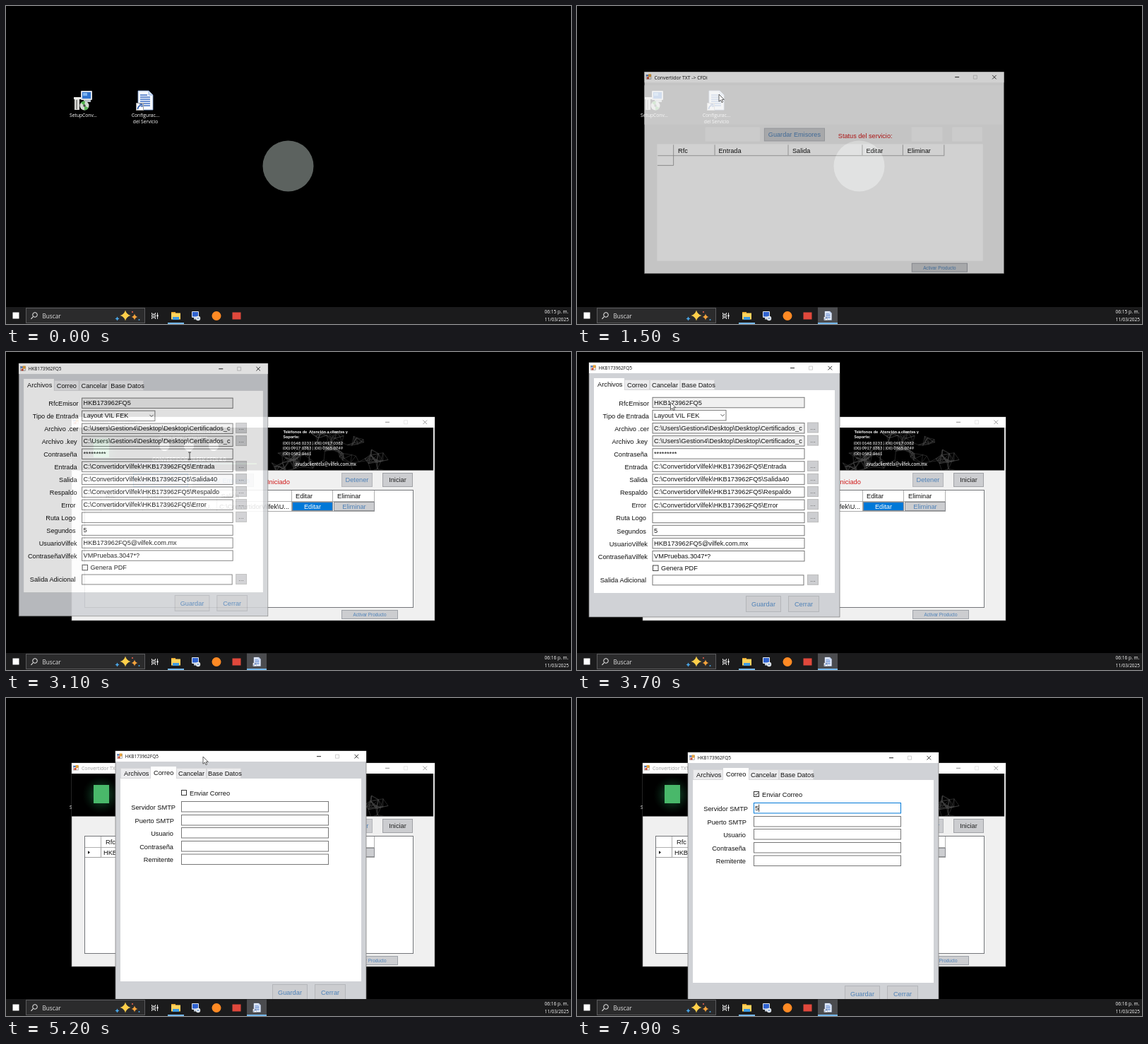
An HTML page for the animation above (8 s loop, 800x450 px).

```html
<!DOCTYPE html>
<html lang="es">
<head>
<meta charset="utf-8">
<title>Convertidor</title>
<style>
  html, body { margin: 0; width: 100%; height: 100%; overflow: hidden; background: #000; }
  svg { display: block; width: 800px; height: 450px; }
  text { font: 9.25px "Liberation Sans", Arial, sans-serif; white-space: pre; }
  .ui { font-family: "Open Sans", "Noto Sans", sans-serif; }
  .strong { font-weight: 500; }
  .ban { font-family: Lato, "Open Sans", sans-serif; }
</style>
</head>
<body>
<svg id="stage" viewBox="0 0 800 450" xmlns="http://www.w3.org/2000/svg"></svg>
<script>
const LOOP = 8000, STEP = 100;
const TAX_ID = 'HKB173962FQ5', BASE = 'C:\\ConvertidorVilfek\\';
const BLUE = '#0078d7', STEEL = '#4f82b8', FACE = '#cccdd0';

// markup helpers
const rect = (x, y, w, h, fill, extra = '') =>
  `<rect x="${x}" y="${y}" width="${w}" height="${h}" fill="${fill}" ${extra}/>`;
const box = (x, y, w, h, fill, stroke, extra = '') =>
  rect(x + .5, y + .5, w - 1, h - 1, fill, `stroke="${stroke}" ${extra}`);
const text = (x, y, s, fill = '#111', extra = '') =>
  `<text x="${x}" y="${y}" fill="${fill}" ${extra}>${s}</text>`;
const ui = (x, y, s, size, fill, extra = '') =>
  text(x, y, s, fill, `class="ui${fill === '#fff' ? ' strong' : ''}" style="font-size:${size}px" ${extra}`);
const ban = (x, y, s, size, weight = 500) =>
  text(x, y, s, '#fff', `class="ban" style="font-size:${size}px;font-weight:${weight}"`);
const path = (d, stroke, width = 1, fill = 'none', extra = '') =>
  `<path d="${d}" fill="${fill}" stroke="${stroke}" stroke-width="${width}" ${extra}/>`;
const circle = (x, y, r, fill) => `<circle cx="${x}" cy="${y}" r="${r}" fill="${fill}"/>`;
const group = (id, body) => `<g id="${id}">${body}</g>`;
const middle = 'text-anchor="middle"', end = 'text-anchor="end"';
const button = (x, y, w, h, label, color = STEEL, stroke = '#b4b6ba') =>
  box(x, y, w, h, FACE, stroke) + text(x + w / 2, y + h / 2 + 3.4, label, color, middle);
const star = (x, y, r, fill) =>
  `<path d="M${x} ${y - r}Q${x + r * .2} ${y - r * .2} ${x + r} ${y}Q${x + r * .2} ${y + r * .2} ${x} ${y + r}Q${x - r * .2} ${y + r * .2} ${x - r} ${y}Q${x - r * .2} ${y - r * .2} ${x} ${y - r}" fill="${fill}"/>`;

function sheet(x, y, s) {
  const lines = [6, 9, 12, 15, 18, 21].map(v => `M5 ${v}H${v < 8 ? 15 : 19}`).join('');
  return `<g transform="translate(${x} ${y}) scale(${s})">` +
    path('M2 0H17L23 6V27H2Z', '#8aa6d8', .8, '#f4f8ff') + path('M17 0V6H23', '#8aa6d8', .8, '#cfe0f8') +
    path(lines, '#3f6fc4', 1.4) + box(-1, 17, 11, 11, '#fff', '#999') +
    path('M1.5 26Q2 21 6 21M4 19H7.5V23', '#1d4fa8', 1.6) + '</g>';
}

function setupIcon() {
  return rect(97, 130, 7, 17, '#d8d8d4') + rect(96, 129, 11, 3, '#f0f0ec') + rect(99, 133, 2, 13, '#8f8f8c') +
    rect(106, 120, 16, 13, '#d5dbe4', 'rx="1"') + rect(108, 122, 12, 9, '#2f74d0') + rect(109, 123, 6, 4, '#7db4f2') +
    rect(110, 133, 10, 3, '#b9bec6') + circle(111, 141, 6.5, '#cfd8d0') +
    path('M111 141L106 137A6.5 6.5 0 0 1 112 134.6Z', 'none', 0, '#4fae4c') +
    path('M111 141L116.5 144A6.5 6.5 0 0 1 111 147.4Z', 'none', 0, '#58b455') + circle(111, 141, 1.7, '#444');
}

const formIcon = (x, y) => rect(x, y + 1, 7, 6, '#f2f2f2', 'stroke="#8a8a8a" stroke-width=".6"') +
  rect(x, y + 1, 7, 2, '#3f73c8') + rect(x + 3, y, 4, 4, '#e8a33a') + rect(x + 1, y + 4, 3, 3, '#c8503c');

const captionButtons = (right, y, color) =>
  path(`M${right - 70} ${y}h6`, color) + path(`M${right - 43.5} ${y - 2.5}h5v5h-5z`, '#c4c4c4', .8) +
  path(`M${right - 16.5} ${y - 2.8}l5.6 5.6m0 -5.6l-5.6 5.6`, color, .9);

// wire dome in the banner
function dome() {
  let seed = 11;
  const rnd = () => (seed = seed * 16807 % 2147483647) / 2147483647;
  const pts = Array.from({ length: 120 }, () => {
    const a = Math.PI * rnd(), r = Math.sqrt(.08 + .92 * rnd());
    return [460 + 86 * r * Math.cos(a), 170 - 58 * r * Math.sin(a)];
  });
  let d = '';
  pts.forEach((p, i) => pts.slice(i + 1).forEach(q => {
    if (Math.hypot(p[0] - q[0], p[1] - q[1]) < 13)
      d += `M${p[0].toFixed(1)} ${p[1].toFixed(1)}L${q[0].toFixed(1)} ${q[1].toFixed(1)}`;
  }));
  return path(d, '#4a4a4a', .5);
}

function desktop() {
  return rect(0, 0, 800, 450, '#000') + setupIcon() + sheet(185, 120, 1) +
    ui(109.5, 157, 'SetupConv...', 6.7, '#fff', middle) +
    ui(197.5, 157, 'Configurac...', 6.8, '#fff', middle) +
    ui(197.5, 166, 'del Servicio', 6.7, '#fff', middle) +
    circle(399.5, 226.5, 36, '#5c625f');
}

function banner() {
  return rect(93, 107, 512, 60.5, '#000') + rect(108, 110, 54, 54, 'url(#glow)') +
    `<g clip-path="url(#bannerClip)">${dome()}</g>` +
    rect(124, 123, 22, 26, '#49b86a') +
    ban(216, 114.5, 'Consulta nuestros horarios de servicio', 5.6) +
    ban(216, 122, '¿Tienes dudas? Contáctanos', 5.6) +
    [224.5, 259, 294].map(x => circle(x, 133, 7, '#fff')).join('') +
    ban(207, 155, 'CONVERTIDOR VILFEK CFDI 4.0', 7, 700) +
    rect(181, 157.5, 174, 1.3, 'url(#rule)') +
    ban(392.5, 114.5, 'Teléfonos de  Atención a clientes y', 6, 700) + ban(392.5, 122, 'Soporte:', 6, 700) +
    ban(392, 130.5, '(00) 0148 0233 | (00) 0917 0382', 5.9) +
    ban(392, 138, '(00) 0917 0383 | (00) 0365 0749', 5.9) +
    ban(392, 145.5, '(00) 0582 0461', 5.9) +
    ban(409, 161, 'ayudaclientela@vilfek.com.mx', 6.6);
}

function mainWindow() {
  const cols = [135, 194, 299, 405, 463, 522];
  const heads = [['Rfc', 141], ['Entrada', 199], ['Salida', 304.5], ['Editar', 410], ['Eliminar', 469]]
    .map(([s, x]) => text(x, 207.3, s)).join('');
  const grid = path('M112 211.5H522' + cols.map(x => `M${x - .5} 196V211`).join(''), '#a8a8a8', .9);
  const row = path('M112 225.5H522' + cols.map(x => `M${x - .5} 211V225`).join(''), '#a0a0a0', .9) +
    path('M116 216.2L119 218.5L116 220.8Z', 'none', 0, '#111') +
    rect(135, 212, 58, 13, BLUE, 'id="rfcSelected"') +
    text(138, 222, 'HKB1739...', '#fff', 'id="rfcText"') +
    text(197, 222, BASE + 'U...') + text(302, 222, BASE + 'U...') +
    box(405, 212, 58, 13, FACE, '#8a8c90', 'id="editCell"') + text(434, 222, 'Editar', STEEL, middle + ' id="editText"') +
    box(464, 212, 58, 13, FACE, '#8a8c90') + text(493, 222, 'Eliminar', STEEL, middle);
  return rect(93, 92, 514, 288, '#f0f0f0', 'stroke="#777" stroke-width=".6"') + rect(93, 92, 514, 15, '#fff') +
    formIcon(95.5, 95) + ui(107, 102.3, 'Convertidor TXT -&gt; CFDi', 6.9, '#111', 'id="mainTitle"') +
    group('mainButtons', captionButtons(607, 99.3, '#222')) +
    rect(111, 195, 466, 167, '#fff') +
    rect(299, 196, 105, 15, '#d9ebf9', 'id="headHover"') + heads + grid +
    path('M111.5 225.5H134.5V211', '#a0a0a0', .9) +
    button(264, 172, 87, 19, 'Guardar Emisores') +
    box(475, 365, 80, 13, FACE, '#9ea2a8') + text(515, 374, 'Activar Producto', STEEL, middle + ' style="font-size:6.4px"') +
    text(370, 186.6, 'Status del servicio:', '#d01818', 'id="status"') +
    group('blank', rect(93, 111, 512, 56, '#f5f5f5') +
      [[180, 78], [475, 44], [533, 43]].map(([x, w]) => rect(x, 171, w, 20, '#f8f8f8')).join('')) +
    group('loaded', banner() + box(111, 195, 466, 167, 'none', '#74767a') + row +
      button(180, 172, 78, 19, 'Agregar Emisor', STEEL, BLUE) +
      button(475, 171, 44, 20, 'Detener') + button(533, 171, 43, 20, 'Iniciar', '#222', '#a0a2a6'));
}

function filesTab() {
  const dots = y => box(326, y - 8, 16, 15, '#cdced1', '#bbb') + text(334, y + 2, '...', '#666', middle);
  const profile = 'C:\\Users\\Gestion4\\Desktop\\Desktop\\Certificados_c';
  const folder = BASE + TAX_ID + '\\';
  // label, right edge of the label, value, read-only, browse button
  const rows = [
    ['RfcEmisor', 102, TAX_ID, 1, 0], ['Tipo de Entrada', 102, 'Layout VIL FEK', 0, 0],
    ['Archivo .cer', 102, profile, 1, 1], ['Archivo .key', 100, profile, 1, 1], ['Contraseña', 100, '*********', 0, 0],
    ['Entrada', 100, folder + 'Entrada', 0, 1], ['Salida', 100, folder + 'Salida40', 0, 1],
    ['Respaldo', 100, folder + 'Respaldo', 0, 1], ['Error', 98, folder + 'Error', 0, 1],
    ['Ruta Logo', 98, '', 0, 1], ['Segundos', 98, '5', 0, 0],
    ['UsuarioVilfek', 100, TAX_ID + '@vilfek.com.mx', 0, 0], ['ContraseñaVilfek', 100, 'VMPruebas.3047*?', 0, 0]];
  let out = '';
  rows.forEach(([label, right, value, locked, browse], i) => {
    const y = 71.3 + 18.1 * i;
    out += text(right, y + 4.2, label, '#111', end) +
      box(106.5, y - 7.5, i === 1 ? 105 : 216, 15.5, locked ? '#f0f0f0' : '#fff', '#777') +
      `<g clip-path="url(#fieldClip)">${text(109, y + 3.4, value)}</g>` + (browse ? dots(y) : '');
  });
  return out + path('M203.5 88.2l2.6 2.6l2.6 -2.6', '#444', .9) +
    box(107, 301.5, 8.5, 8.5, '#fff', '#444') + text(119, 309, 'Genera PDF') +
    text(98, 326, 'Salida Adicional', '#111', end) + box(106.5, 315.3, 215, 15, '#fff', '#777') + dots(322.8);
}

function mailTab() {
  const rows = [['Servidor SMTP', 102, 86], ['Puerto SMTP', 100, 105], ['Usuario', 99, 123], ['Contraseña', 99, 142], ['Remitente', 99, 160.5]];
  return box(110, 70, 8, 8, '#fff', '#333') + path('M111.8 74l1.6 1.7l3 -3.6', '#222', 1, 'none', 'id="tick"') +
    text(122, 77.5, 'Enviar Correo') +
    rows.map(([label, right, y], i) => text(right, y + 11.5, label, '#111', end) +
      box(110, y, 209, 15.5, '#fff', '#777', `id="mail${i}"`)).join('') +
    text(112, 97.2, '5', '#111', 'id="typed"') + rect(117.3, 88.5, .8, 10.5, '#111', 'id="caret"');
}

function dialog() {
  const tabs = [['Archivos', 24, 43, 29], ['Correo', 67, 36, 71], ['Cancelar', 103, 43, 106], ['Base Datos', 146, 49, 148]];
  return rect(17, 15, 355, 360, '#d0d2d6', 'stroke="#777" stroke-width=".7"') + rect(17, 15, 355, 15, '#fff') +
    formIcon(19.5, 18.5) + ui(30.5, 25.3, TAX_ID, 6.5, '#111') + captionButtons(372, 22.7, '#222') +
    tabs.map(([, x, w]) => box(x, 39, w, 15, '#ececee', '#d8d8da')).join('') +
    rect(24, 54, 341, 287, '#fff') + rect(24, 37, 43, 18, '#fff', 'id="activeTab"') +
    tabs.map(([s, , , x], i) => text(x, 50, s, '#111', `id="tab${i}"`)).join('') +
    group('files', filesTab()) + group('mail', mailTab()) +
    button(239, 345, 50, 23, 'Guardar') + button(299, 345, 44, 23, 'Cerrar');
}

function taskbar() {
  return rect(0, 426, 800, 24, '#1b1b1c') + rect(9.5, 433.5, 9, 9, '#fff') +
    box(28, 427, 169, 22, '#2b2b2c', '#5a5a5c') +
    '<circle cx="41" cy="437" r="3.3" fill="none" stroke="#eee"/>' + path('M38.5 439.5L35.5 442.8', '#eee', 1.1) +
    ui(51.5, 441.7, 'Buscar', 8.2, '#e4e4e4') +
    star(169, 438, 7.5, '#ffcf4a') + star(182, 440, 4.5, '#f7a43c') + star(157.5, 442.5, 3, '#49a6e8') +
    circle(179, 433, 1.1, '#e8604c') + circle(188.5, 444, 1, '#4aa5e5') +
    path('M206.5 434v2h5v-2M206.5 443v-2h5v2M206.5 437.3h5v2.4h-5zM214.5 434v9', '#eee', .9) + rect(213.5, 437, 2, 2.5, '#fff') +
    rect(234, 433, 6, 4, '#e9a52c') + rect(234, 434.5, 13, 9, '#ffd35c') + rect(236, 440, 9, 4, '#3f9be0') + rect(229, 448, 23, 2, '#76b9ed') +
    rect(263, 432, 10, 9, '#dfe7f2', 'rx="1"') + rect(264, 433, 8, 6.5, '#2f62cf') + rect(266, 441, 5, 2.5, '#c5cedb') +
    circle(272, 442, 3.2, '#e8ecef') + path('M270.3 441l1.6 1l-1.6 1.2m3.4 -2.2l-1.4 1l1.4 1.2', '#3a6fb8', .7) +
    circle(298, 438.5, 6.5, '#ff8a24') + rect(320.5, 433.5, 12, 10, '#e0483c') +
    group('taskItem', rect(341, 426.5, 28, 23.5, '#4b4c4f') + rect(341, 448, 28, 2, '#76b9ed') + sheet(350, 432, .46)) +
    ui(796.5, 435.3, '06:15 p. m.', 6.6, '#fff', end + ' id="clock"') + ui(796.8, 446, '11/03/2025', 6.4, '#fff', end);
}

const cursors =
  group('arrow', path('M0 0V10.2L2.4 8L4 11.6L5.7 10.8L4.1 7.4H7.3Z', '#222', .7, '#fff')) +
  group('beam', path('M-2 -5H2M0 -5V5M-2 5H2', '#222', .8)) +
  group('resize', path('M-6 0L-3 -3V-1.2H3V-3L6 0L3 3V1.2H-3V3Z', '#555', .6, '#fff'));

const stage = document.getElementById('stage');
stage.innerHTML = `<defs>
  <radialGradient id="glow"><stop offset=".3" stop-color="#1c6b3e" stop-opacity=".6"/><stop offset="1" stop-color="#0a2a18" stop-opacity="0"/></radialGradient>
  <linearGradient id="rule"><stop offset="0" stop-color="#6d5bc8"/><stop offset=".5" stop-color="#4fa3d8"/><stop offset="1" stop-color="#6cc04a"/></linearGradient>
  <clipPath id="bannerClip">${rect(93, 107, 512, 60, '#000')}</clipPath>
  <clipPath id="fieldClip">${rect(107, 60, 214, 270, '#000')}</clipPath></defs>` +
  desktop() + group('main', mainWindow()) + group('dialog', dialog()) + taskbar() + group('cursor', cursors);

const el = {};
stage.querySelectorAll('[id]').forEach(node => el[node.id] = node);
const show = (id, on) => el[id].setAttribute('display', on ? 'inline' : 'none');
const set = (id, name, value) => el[id].setAttribute(name, value);

// pointer stops: time, x, y
const stops = [[0, 560, 470], [900, 201, 125], [1600, 201, 125], [2300, 404, 204], [2700, 436, 219], [2900, 436, 219],
  [3100, 260, 147], [3400, 260, 147], [4000, 90, 46], [4400, 98, 48], [4700, 141, 23], [5200, 279, 83], [5400, 281, 85],
  [5900, 254, 135], [6400, 254, 135], [7000, 300, 156], [8000, 300, 156]];
const ease = u => u * (2 - u);

function pointerAt(t) {
  const i = stops.findIndex(s => s[0] > t), [t0, x0, y0] = stops[i - 1], [t1, x1, y1] = stops[i];
  const u = ease((t - t0) / (t1 - t0));
  return [x0 + (x1 - x0) * u, y0 + (y1 - y0) * u];
}

// windows fade in while growing slightly around their centre
function openWindow(id, t, start, levels, cx, cy, dx = 0, dy = 0) {
  const alpha = t < start ? 0 : levels[(t - start) / STEP] ?? 1;
  const k = 1 - .055 * (1 - alpha);
  show(id, alpha > 0);
  set(id, 'opacity', alpha);
  set(id, 'transform', `translate(${dx + cx * (1 - k)} ${dy + cy * (1 - k)}) scale(${k})`);
}

function render(now) {
  const t = Math.floor(now % LOOP / STEP) * STEP;
  const [px, py] = pointerAt(t);
  const [gx, gy] = t < 4700 ? [141, 23] : pointerAt(Math.min(t, 5400));

  openWindow('main', t, 1400, [.35, .82], 350, 236);
  const loaded = t >= 1700, editing = t >= 2800, inactive = t >= 3000;
  show('blank', !loaded);
  show('loaded', loaded);
  show('taskItem', t >= 1400);
  show('headHover', t >= 2200 && t < 2500);
  show('rfcSelected', !editing);
  el.status.textContent = loaded ? 'Iniciado' : 'Status del servicio:';
  set('rfcText', 'fill', editing ? '#111' : '#fff');
  set('editCell', 'fill', editing ? BLUE : FACE);
  set('editText', 'fill', editing ? '#fff' : STEEL);
  set('mainTitle', 'fill', inactive ? '#999' : '#111');
  set('mainButtons', 'opacity', inactive ? .5 : 1);
  el.clock.textContent = t < 2900 ? '06:15 p. m.' : '06:16 p. m.';

  openWindow('dialog', t, 3000, [.4, .88], 194.5, 195, gx - 141, gy - 23);
  const mail = t >= 4000, focused = t >= 7000, typed = t >= 7700;
  show('files', !mail);
  show('mail', mail);
  set('activeTab', 'x', mail ? 67 : 24);
  set('activeTab', 'width', mail ? 36 : 43);
  set('tab0', 'y', mail ? 50 : 49);
  set('tab1', 'y', mail ? 48.7 : 50);
  show('tick', t >= 6200);
  set('mail0', 'stroke', focused ? BLUE : '#777');
  show('typed', typed);
  show('caret', focused && (typed || t % 1000 < 500));
  set('caret', 'x', typed ? 117.3 : 112.3);

  const beam = t >= 3100 && t < 3600 || t >= 6900, resize = t >= 2300 && t < 2500;
  show('cursor', !typed);
  show('beam', beam);
  show('resize', resize);
  show('arrow', !beam && !resize);
  set('cursor', 'transform', `translate(${px} ${py})`);
}

const begin = performance.now();
function tick() {
  render(Math.max(0, performance.now() - begin));
  requestAnimationFrame(tick);
}
tick();
</script>
</body>
</html>
```
